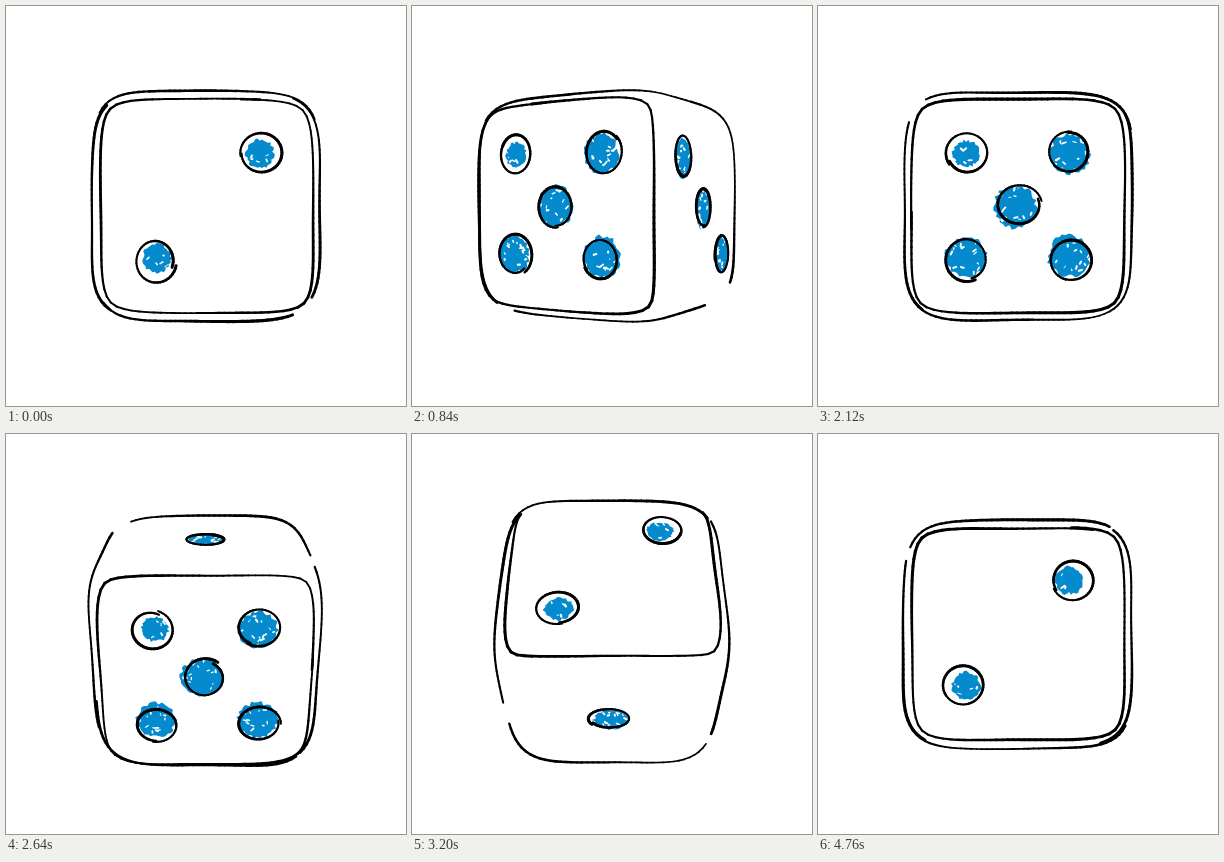
These frames come from a looping animation (400 by 400 pixels, 4800 ms). An HTML page with a canvas:

```html
<!DOCTYPE html>
<html lang="en">
<head>
<meta charset="utf-8">
<title>Sketched die</title>
<style>
  html, body { margin: 0; width: 100%; height: 100%; overflow: hidden; background: #fff; }
  canvas { display: block; width: 400px; height: 400px; }
</style>
</head>
<body>
<canvas id="stage" width="400" height="400"></canvas>
<script>
const ctx = document.getElementById('stage').getContext('2d');
const LOOP = 4800, HALF = 2400, ROLL = 1200, LEAD = 40;
const CAM = 715;              // camera distance
const SIZE = 105.5, POW = 5.3; // bulged cube: |x|^n + |y|^n + |z|^n = SIZE^n
const PIP_DEPTH = 98, PIP_GAP = 46, PIP_R = 17.4;
const INK = '#000', BLUE = '#058bcd';
const TAU = Math.PI * 2;

// Pips: column, row, blob radius, blob offset x and y
const FACES = [
  { n: [0, 0, 1], u: [1, 0, 0], v: [0, 1, 0],
    pips: [[1, -1, 12.3, -1, 0], [-1, 1, 12.3, 2, -1]] },
  { n: [-1, 0, 0], u: [0, 0, 1], v: [0, 1, 0],
    pips: [[-1, -1, 17, 1, 3], [0, 0, 17.5, 0, 3], [1, 1, 18.5, 2, 1]] },
  { n: [0, 0, -1], u: [-1, 0, 0], v: [0, 1, 0],
    pips: [[-1, -1, 11.5, 2, 0], [1, -1, 17, -1, 0], [0, 0, 18.5, -2, 0],
           [-1, 1, 17.5, 0, -3], [1, 1, 18, -1, -3]] },
  { n: [0, -1, 0], u: [1, 0, 0], v: [0, 0, 1], pips: [[0, 0, 17, 0, -1]] }
];

let rand, yaw, pitch;

function seeded(seed) {
  let s = Math.imul(seed + 17, 0x9E3779B1);
  return () => {
    s = (s + 0x6D2B79F5) | 0;
    let x = Math.imul(s ^ (s >>> 15), 1 | s);
    x = (x + Math.imul(x ^ (x >>> 7), 61 | x)) ^ x;
    return ((x ^ (x >>> 14)) >>> 0) / 4294967296;
  };
}
const span = (a, b) => a + (b - a) * rand();
const jit = a => span(-a, a);
const dot = (a, b) => a[0] * b[0] + a[1] * b[1] + a[2] * b[2];
const spow = (x, p) => Math.sign(x) * Math.abs(x) ** p;
const turnY = ([x, y, z], a) =>
  [x * Math.cos(a) + z * Math.sin(a), y, z * Math.cos(a) - x * Math.sin(a)];
const turnX = ([x, y, z], a) =>
  [x, y * Math.cos(a) + z * Math.sin(a), z * Math.cos(a) - y * Math.sin(a)];
const rotate = p => turnX(turnY(p, yaw), pitch);
const unrotate = p => turnY(turnX(p, -pitch), -yaw);
const facing = f => rotate(f.n)[2];
const onFace = (f, a, b, c) => f.n.map((n, i) => n * c + f.u[i] * a + f.v[i] * b);

function project(p) {
  const [x, y, z] = rotate(p), s = CAM / (CAM - z);
  return [200 + x * s, 200 + y * s];
}

// Evenly spaced points along a closed polyline
function resample(pts, count) {
  const ring = pts.concat([pts[0]]), sum = [0];
  for (let i = 1; i < ring.length; i++)
    sum.push(sum[i - 1] + Math.hypot(ring[i][0] - ring[i - 1][0], ring[i][1] - ring[i - 1][1]));
  const total = sum[sum.length - 1], out = [];
  for (let k = 0, j = 0; k < count; k++) {
    const d = total * k / count;
    while (sum[j + 1] < d) j++;
    const t = (d - sum[j]) / (sum[j + 1] - sum[j] || 1);
    out.push([0, 1].map(i => ring[j][i] + (ring[j + 1][i] - ring[j][i]) * t));
  }
  return out;
}

// Hand-drawn stroke: slow drift off the path and a changing line weight
function sketch(pts, drift, weight) {
  const ph = [0, 1, 2, 3, 4].map(() => rand() * TAU);
  const f = span(0.03, 0.06);
  const moved = pts.map(([x, y], i) => [
    x + drift * (Math.sin(i * f + ph[0]) + 0.3 * Math.sin(i * 0.31 + ph[1])),
    y + drift * (Math.sin(i * f + ph[2]) + 0.3 * Math.sin(i * 0.27 + ph[3]))
  ]);
  ctx.strokeStyle = INK;
  for (let i = 1; i < moved.length; i++) {
    ctx.lineWidth = weight + 0.5 * Math.sin(i * 0.12 + ph[4]);
    ctx.beginPath();
    ctx.moveTo(...moved[i - 1]);
    ctx.lineTo(...moved[i]);
    ctx.stroke();
  }
}

// Outline of the bulged cube: tangent planes through the camera
function silhouette() {
  const q = POW / (POW - 1), pts = [];
  for (let k = 0; k < 720; k++) {
    const a = (k + 0.5) / 720 * TAU - TAU * 3 / 8;
    let tilt = 0.15, local, norm;
    for (let i = 0; i < 6; i++) {
      const c = Math.sqrt(1 - tilt * tilt);
      local = unrotate([Math.cos(a) * c, Math.sin(a) * c, tilt]);
      norm = local.reduce((s, x) => s + Math.abs(x) ** q, 0) ** (1 / q);
      tilt = SIZE * norm / CAM;
    }
    pts.push(project(local.map(x => SIZE * spow(x / norm, q - 1))));
  }
  return resample(pts, 160);
}

function drawBody() {
  const pts = silhouette();
  for (let side = 0; side < 4; side++) {
    const start = Math.round(side * 40 + jit(4));
    const len = Math.round(span(36, 47));
    const part = [];
    for (let i = 0; i <= len; i++) part.push(pts[(start + i + 160) % 160]);
    sketch(part, 1, span(2, 2.8));
  }
}

function drawFace(f) {
  const count = 120, first = Math.floor(rand() * count);
  let run = [];
  const flush = () => {
    if (run.length > 1) sketch(run, 0.8, span(2, 2.7));
    run = [];
  };
  for (let i = 0; i <= count + 3; i++) {
    const a = (first + i) / count * TAU;
    const c = Math.cos(a), s = Math.sin(a);
    const r = (Math.abs(c) ** 18 + Math.abs(s) ** 18) ** (-1 / 18);
    const p = onFace(f, c * r, s * r, 1);
    const norm = p.reduce((t, x) => t + Math.abs(x) ** POW, 0) ** (1 / POW);
    const surf = p.map(x => x * SIZE / norm);
    const normal = rotate(p.map(x => spow(x, POW - 1)));
    const at = rotate(surf);
    if (dot(normal, [-at[0], -at[1], CAM - at[2]]) > 0) run.push(project(surf));
    else flush();
  }
  flush();
}

function drawPip(f, [col, row, size, ox, oy]) {
  const at = (x, y) => project(onFace(f, col * PIP_GAP + x, row * PIP_GAP + y, PIP_DEPTH));
  const bx = ox + jit(1.2), by = oy + jit(1.2);

  // Ragged blue fill with a few uncoloured flecks
  ctx.fillStyle = BLUE;
  ctx.beginPath();
  for (let i = 0; i < 40; i++) {
    const a = i / 40 * TAU, r = size * span(0.88, 1.1);
    ctx.lineTo(...at(bx + r * Math.cos(a), by + r * Math.sin(a)));
  }
  ctx.fill();
  ctx.strokeStyle = '#fff';
  const flecks = size > 14 ? 15 : 5;
  for (let i = 0; i < flecks; i++) {
    const a = rand() * TAU, r = size * span(0.4, 0.95);
    const x = bx + r * Math.cos(a), y = by + r * Math.sin(a);
    ctx.lineWidth = span(0.9, 2.2);
    ctx.beginPath();
    ctx.moveTo(...at(x, y));
    ctx.lineTo(...at(x + jit(3), y + jit(2.5)));
    ctx.stroke();
  }

  const cx = jit(2.2), cy = jit(2.2), rx = PIP_R * span(0.95, 1.06), ry = PIP_R * span(0.95, 1.05);
  const from = rand() * TAU, grow = jit(0.16), ring = [];
  for (let i = 0; i <= 45; i++) {
    const a = from + i / 44 * TAU, k = 1 + grow * (i / 44 - 0.5);
    ring.push(at(cx + rx * k * Math.cos(a), cy + ry * k * Math.sin(a)));
  }
  sketch(ring, 0.3, 2.5);
}

function draw(time) {
  const t = (time + LEAD) % LOOP, half = Math.floor(t / HALF), local = t % HALF;
  const u = Math.min(local / ROLL, 1);
  const angle = Math.PI * (1 - Math.cos(Math.PI * u)) / 2;
  yaw = half ? Math.PI : angle;
  pitch = half ? angle : 0;
  rand = seeded(Math.round(t / 40));

  ctx.fillStyle = '#fff';
  ctx.fillRect(0, 0, 400, 400);
  ctx.lineCap = ctx.lineJoin = 'round';
  const seen = FACES.filter(f => facing(f) * CAM > PIP_DEPTH);
  for (const f of seen) for (const pip of f.pips) drawPip(f, pip);
  // Only the nearest face gets its own outline
  drawFace(seen.reduce((a, b) => facing(b) > facing(a) ? b : a));
  drawBody();
}

// Rolling is drawn every 40 ms, resting every 120 ms
function snap(now) {
  const t = (now + LEAD) % LOOP, step = t % HALF < ROLL ? 40 : 120;
  return (Math.floor(t / step) * step - LEAD + LOOP) % LOOP;
}

const begin = performance.now();
let shown = -1;
function tick() {
  const time = snap(performance.now() - begin);
  if (time !== shown) draw(shown = time);
  requestAnimationFrame(tick);
}
tick();
</script>
</body>
</html>
```
